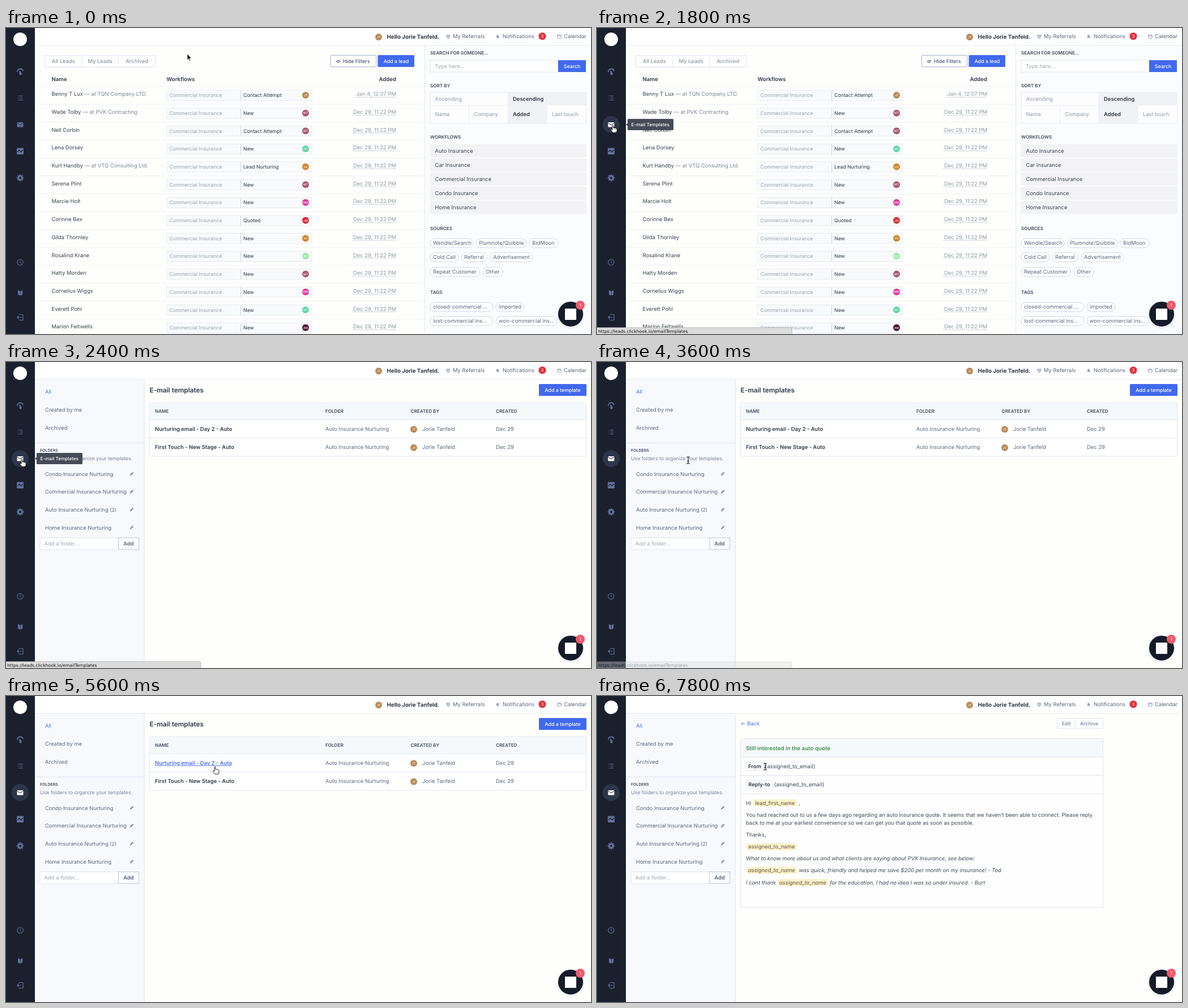
Animation, 1033 px wide and 542 px high, one loop 8 s. Source, as an HTML page:

```html
<!DOCTYPE html>
<html lang="en">
<head>
<meta charset="utf-8">
<title>Leads and e-mail templates</title>
<style>
html, body { margin: 0; width: 100%; height: 100%; overflow: hidden; background: #fefefd; }
svg { display: block; width: 100%; height: 100%; }
text { font-family: Inter, "Open Sans", sans-serif; text-rendering: geometricPrecision; white-space: pre; }
</style>
</head>
<body>
<svg id="stage" viewBox="0 0 1033 542"></svg>
<script>
const LOOP = 8000, STEP = 200;
const BLUE = '#4169ee', LINK = '#4a72e4', INK = '#2f3747', SLATE = '#5b667c', MUTE = '#8f98a6',
      EDGE = '#dde3ec', PALE = '#f6f9fc', TAN = '#b88c56', NAV = '#62709a';
const S = 9.43, M = 8.8, CAPS = 8.15;

// Text is placed by its left edge and the middle of its capitals.
const text = (x, y, s, fill = SLATE, size = S, weight = 400, extra = '') =>
  `<text x="${x}" y="${(y + size * 0.36).toFixed(2)}" fill="${fill}" font-size="${size}" font-weight="${weight}" ${extra}>${s}</text>`;
const mid = (x, y, s, fill, size, weight) => text(x, y, s, fill, size, weight, 'text-anchor="middle"');
const caps = (x, y, s, size = CAPS) => text(x, y, s, '#414a5c', size, 600);
const box = (x, y, x2, y2, fill, stroke = 'none', r = 0) =>
  `<rect x="${x}" y="${y}" width="${x2 - x}" height="${y2 - y}" rx="${r}" fill="${fill}" stroke="${stroke}" stroke-width=".9"/>`;
const line = (x, y, x2, y2, stroke = EDGE, extra = '') =>
  `<path d="M${x} ${y}L${x2} ${y2}" stroke="${stroke}" stroke-width=".9" ${extra}/>`;
const disc = (x, y, r, fill) => `<circle cx="${x}" cy="${y}" r="${r}" fill="${fill}"/>`;
const path = (d, fill = 'none', stroke = 'none', w = 1) =>
  `<path d="${d}" fill="${fill}" stroke="${stroke}" stroke-width="${w}" stroke-linejoin="round" stroke-linecap="round"/>`;
const avatar = (x, y, s, fill = TAN) => disc(x, y, 6, fill) + mid(x, y, s, '#fff', 5, 500);
const group = (id, s) => `<g id="${id}">${s}</g>`;

function sidebar() {
  let gear = '';
  for (let a = 0; a < 360; a += 45)
    gear += `<rect x="23.7" y="259.4" width="2.6" height="3" fill="${NAV}" transform="rotate(${a} 25 265.5)"/>`;
  return box(0, 0, 51, 542, '#1a202d') + disc(25, 20, 12, '#fff') +
    path('M20 77a5.2 5.2 0 0 1 10-1.5', 'none', NAV, 1.8) +
    path('M23.4 75.5q4.4 2.6 4.2 5.8a2 2 0 0 1-4 .2z', NAV) +
    [120.5, 124, 127.5].map(y => path(`M21 ${y}h.3M23.5 ${y}h5.5`, 'none', NAV, 1)).join('') +
    group('mail', `<circle id="halo" cx="25" cy="171" r="15" fill="#2d354a"/>
      <rect id="letter" x="19.5" y="167" width="11" height="8.4" rx="1"/>` +
      path('M20 168.6l5 3.2 5-3.2', 'none', '#1f2637', 1)) +
    box(19, 212.5, 31, 224, NAV, 'none', 1) + path('M20.5 219l3-2.5 3 3 3-3', 'none', '#1a202d', 1.2) +
    gear + `<circle cx="25" cy="265.5" r="3.2" fill="none" stroke="${NAV}" stroke-width="2.4"/>` +
    `<circle cx="25" cy="415" r="5.2" fill="none" stroke="${NAV}" stroke-width="1.1"/>` +
    path('M25 412v3.2l1.8 1.4', 'none', NAV) +
    path('M21 464.2l4 2v7.8l-4-2zM25.6 466l3.6-1.6v7.6l-3.6 2z', NAV) +
    path('M23 507.5h7v10h-7M27 512.5h-7M22.4 510l-2.5 2.5 2.5 2.5', 'none', NAV, 1.2);
}

function header() {
  return box(51, 0, 1033, 30, '#fff') + line(51, 30.5, 1033, 30.5, '#e6e9ee') +
    avatar(658, 16, 'JT') + text(672.5, 15, 'Hello Jorie Tanfeld.', INK, 9.8, 700) +
    path('M778 12.5h5.6v2.6q-.4 2.4-2.8 3.6-2.4-1.2-2.8-3.6z', '#c5ccdb', '#8793b0', .8) +
    text(789, 15, 'My Referrals') +
    path('M866 17.5v-3.2q0-2 2-2.2 2 .2 2 2.2l1.2 3.2z', '#9aa5bd') + text(877, 15, 'Notifications') +
    disc(947, 14.5, 6.6, '#e0323f') + mid(947, 14.5, '3', '#fff', 7.2) +
    box(973.8, 12.3, 980.2, 18.2, 'none', '#8d98b0', .8) + path('M974 14h6', 'none', '#8d98b0') +
    text(985, 15, 'Calendar');
}

const leads = [
  ['Benny T Lux', 'TQN Company LTD.', 'Contact Attempt', 'JT'], ['Wade Tolby', 'PVK Contracting', 'New', 'MT'],
  ['Nell Corbin', '', 'Contact Attempt', 'MT'], ['Lena Dorsey', '', 'New', 'DC'],
  ['Kurt Handby', 'VTQ Consulting Ltd.', 'Lead Nurturing', 'LU'], ['Serena Plint', '', 'New', 'MT'],
  ['Marcie Holt', '', 'New', 'MW'], ['Corinne Bex', '', 'Quoted', 'JW'],
  ['Gilda Thornley', '', 'New', 'LU'], ['Rosalind Krane', '', 'New', 'BC'],
  ['Hatty Morden', '', 'New', 'MT'], ['Cornelius Wiggs', '', 'New', 'MW'],
  ['Everett Pohl', '', 'New', 'DC'], ['Marion Feltwells', '', 'New', 'AM']
];
const tint = { JT: TAN, MT: '#a9596b', DC: '#62d8a4', LU: '#d2882d', MW: '#e23a9e', JW: '#d72c36', BC: '#9ceda4', AM: '#4d1234' };

function leadRow([name, firm, stage, owner], i) {
  const y = 117 + 31.68 * i, w = y + 2.2, dated = i ? 'Dec 29, 11:22 PM' : 'Jan 4, 12:07 PM';
  const at = firm && `<tspan fill="#7d8695"> — at ${firm}</tspan>`;
  return line(55, y - 13.5, 739, y - 13.5, '#eff1f4') + text(80.5, y, name + at, '#39414f') +
    box(283.5, w - 9, 540, w + 9.2, '#f8fafc', '#e6eaef') + line(414.5, w - 9, 414.5, w + 9.2, '#ccd3dd') +
    text(288.5, w, 'Commercial Insurance', '#9aa1ac', M) + text(419, w, stage, '#2f3745', M) +
    avatar(529, w - .2, owner, tint[owner]) +
    text(689, y, dated, MUTE, S, 400, 'text-anchor="end"') +
    line(i ? 611.5 : 617.5, y + 5.6, 689, y + 5.6, '#a3abb6', 'stroke-dasharray="1.2 .8"');
}

const chip = (x, x2, y, s) => box(x, y - 8, x2, y + 8, '#fff', '#cbd3e0', 8) + text(x + 5, y, s);

function filters() {
  const flows = ['Auto', 'Car', 'Commercial', 'Condo', 'Home'];
  return box(739, 31, 1033, 542, '#fbfcfd') + line(739.5, 31, 739.5, 542, '#e3e7ee') +
    caps(749, 44.5, 'SEARCH FOR SOMEONE...') + box(749, 57, 975, 78, '#fff', EDGE) +
    text(757, 67.5, 'Type here...', '#a0a7b3') + box(975, 57, 1024, 78, BLUE) + mid(999.5, 67.7, 'Search', '#fff', M, 500) +
    caps(749, 102, 'SORT BY') + box(749, 114, 1024.5, 169, '#fdfdfe', '#e6eaef') +
    path('M887 114H1024.5V137H955.5V169H887z', '#f1f2f5') + line(749, 137, 887, 137, '#e6eaef') +
    line(886.5, 114, 886.5, 137, '#e6eaef') + line(817.5, 137, 817.5, 169, '#e6eaef') + line(886.5, 137, 886.5, 169, '#e6eaef') +
    text(757.5, 126, 'Ascending', MUTE) + text(895, 126, 'Descending', INK, S, 600) +
    text(757.5, 153, 'Name', MUTE) + text(826.5, 153, 'Company', MUTE) + text(895, 153, 'Added', INK, S, 600) +
    text(964, 153, 'Last touch', MUTE) + caps(749, 193.5, 'WORKFLOWS') +
    flows.map((f, i) => box(749, 206 + 25 * i, 1025, 229 + 25 * i, '#f3f3f5') +
      text(757.5, 217.5 + 25 * i, f + ' Insurance', '#39414f')).join('') +
    caps(749, 355, 'SOURCES') + chip(749, 825, 381, 'Wendle/Search') + chip(830, 918.5, 381, 'Plumnote/Quibble') +
    chip(924, 975, 381, 'BidMoon') + chip(749, 799, 406, 'Cold Call') + chip(804, 849.5, 406, 'Referral') +
    chip(855, 930, 406, 'Advertisement') + chip(749, 836.5, 432, 'Repeat Customer') + chip(842, 877.5, 432, 'Other') +
    caps(749, 468, 'TAGS') + chip(749, 860, 494, 'closed-commercial ...') + chip(865, 915, 494, 'imported') +
    chip(749, 860, 519, 'lost-commercial ins...') + chip(865, 973, 519, 'won-commercial ins...');
}

function leadsPage() {
  return box(68.5, 48.5, 264, 69.5, '#fff', EDGE, 1.5) + line(134, 48.5, 134, 69.5) + line(198.5, 48.5, 198.5, 69.5) +
    mid(101.3, 59, 'All Leads', MUTE, S, 500) + mid(166.3, 59, 'My Leads', MUTE, S, 500) + mid(231.3, 59, 'Archived', MUTE, S, 500) +
    box(573.3, 48.3, 653.7, 68.8, '#fff', '#98a4ca', 1.5) + text(595, 59, 'Hide Filters', '#4a5570', M, 500) +
    path('M583 59q3.5-3.6 7 0-3.5 3.4-7 0M584.8 61.6l4-5', 'none', '#4a5570', .9) +
    box(656.5, 48, 721, 69, BLUE, 'none', 1.5) + mid(689, 59, 'Add a lead', '#fff', M, 500) +
    text(80.5, 90.5, 'Name', INK, 9.6, 600) + text(283.5, 90.5, 'Workflows', INK, 9.6, 600) +
    text(689, 90.5, 'Added', INK, 9.6, 600, 'text-anchor="end"') + leads.map(leadRow).join('') + filters();
}

function folders() {
  const names = ['Condo', 'Commercial', 'Auto', 'Home'];
  return box(51, 31, 244, 542, '#f7f9fc') + line(244.3, 31, 244.3, 542) +
    text(69, 53, 'All', LINK) + text(69, 85, 'Created by me') + text(69, 116.5, 'Archived') +
    line(51, 143.3, 244, 143.3) + caps(60, 156.8, 'FOLDERS', 7) +
    text(60, 171, 'Use folders to organize your templates.', '#78829a', M) +
    names.map((n, i) => {
      const y = 198.2 + 31.7 * i;
      return text(69, y, n + ' Insurance Nurturing' + (n == 'Auto' ? ` <tspan font-size="${M}">(2)</tspan>` : ''), SLATE, 9.38) +
        path(`M219.2 ${y + 2.6}l.6-2 3.8-3.7 1.3 1.4-3.8 3.7z`, '#7c8598', '#7c8598', .5);
    }).join('') +
    box(60, 311.5, 198.5, 332, '#fff', EDGE) + text(67.5, 321.5, 'Add a folder...', '#a0a7b3') +
    box(198.5, 311.5, 234.5, 332, '#fbfcfe', '#b9c4d8') + mid(216.5, 322, 'Add', SLATE, S, 600);
}

function listPage() {
  const row = (y, id, name) => text(263, y, name, INK, S, 600, `id="${id}"`) + text(564, y, 'Auto Insurance Nurturing') +
    avatar(720, y + .8, 'JT') + text(735, y, 'Jorie Tanfeld') + text(865, y, 'Dec 29');
  return text(253.5, 50, 'E-mail templates', INK, 11.8, 600) +
    box(941, 39, 1025, 60, BLUE, 'none', 1.5) + mid(983, 50, 'Add a template', '#fff', M, 500) +
    box(253.5, 72, 1024.5, 167, '#fff', EDGE, 1.5) + box(254, 72.5, 1024, 102, PALE) +
    line(253.5, 102.3, 1024.5, 102.3) + line(253.5, 134.6, 1024.5, 134.6) +
    caps(263, 87, 'NAME') + caps(564, 87, 'FOLDER') + caps(714.5, 87, 'CREATED BY') + caps(865, 87, 'CREATED') +
    row(118.5, 'link', 'Nurturing email - Day 2 - Auto') + row(151, 'other', 'First Touch - New Stage - Auto');
}

function mailPage() {
  const body = (x, y, s, extra = '') => text(x, y, s, '#3f4757', S, 400, extra);
  const ital = (x, y, s) => body(x, y, s, 'font-style="italic"');
  const field = (x, x2, y, s, style = '') => box(x, y - 6.3, x2, y + 6.3, '#fcf1ca', 'none', 5) +
    text((x + x2) / 2, y, s, '#5c5640', S, 400, `text-anchor="middle" ${style}`);
  const label = (x2, y, s) => box(263.4, y - 7.3, x2, y + 7.3, '#fff', EDGE, 1.5) + mid((263.4 + x2) / 2, y, s, INK, S, 600);
  return text(253.5, 48.5, '← Back', LINK) +
    box(812.5, 39.5, 893.5, 57.5, '#fdfdfe', EDGE, 1.5) + line(845, 39.5, 845, 57.5) +
    mid(828.7, 48.5, 'Edit', '#7c8698', M, 500) + mid(869, 48.5, 'Archive', '#7c8698', M, 500) +
    box(253.5, 75.5, 893.5, 374.5, '#fefefe', EDGE, 1.5) + box(254, 76, 893, 108, PALE) +
    [108.2, 140.6, 173].map(y => line(253.5, y, 893.5, y)).join('') +
    text(263, 92, 'Still interested in the auto quote', '#3c8f4a', 9.75, 600) +
    label(293.5, 124.6, 'From') + body(296.5, 124.6, '{assigned_to_email}') +
    label(309.5, 157, 'Reply-to') + body(312.5, 157, '{assigned_to_email}') +
    body(263, 189.3, 'Hi') + field(275, 353.5, 189.3, 'lead_first_name') + body(356, 189.3, ',') +
    body(263, 210.7, 'You had reached out to us a few days ago regarding an auto insurance quote. It seems that we haven’t been able to connect. Please reply') +
    body(263, 224.8, 'back to me at your earliest convenience so we can get you that quote as soon as possible.') +
    body(263, 245.5, 'Thanks,') + field(263, 353.5, 267, 'assigned_to_name') +
    ital(263, 287.5, 'What to know more about us and what clients are saying about PVK Insurance, see below:') +
    field(263, 353.5, 309, 'assigned_to_name', 'font-style="italic"') +
    ital(356.5, 309, 'was quick, friendly and helped me save $200 per month on my insurance! - Tod') +
    ital(263, 330.3, 'I cant thank') + field(319, 407.5, 330.3, 'assigned_to_name', 'font-style="italic"') +
    ital(411, 330.3, 'for the education, I had no idea I was so under insured. - Burt');
}

function overlays() {
  return group('tip', path('M51 171l4-3.2v6.4z', '#454c58') + box(54, 161, 135, 181, '#454c58', 'none', 1.5) +
      text(60.5, 171, 'E-mail Templates', '#fff', 8.2, 500)) +
    disc(997, 508, 24.5, 'rgba(20,25,40,.05)') + disc(997, 506.7, 22, '#161b29') + box(987, 497, 1007, 517, '#fff') +
    disc(1014, 491, 8, '#ee5a6c') + mid(1014, 491, '1', '#fff', 8) +
    group('status', box(-1, 530.8, 344, 543, '#dcdcdc', '#b4b4b4', 1.5) +
      text(2, 537, 'https://leads.clickhook.io/emailTemplates', '#111', 7.7, 400, 'style="font-family:\'DejaVu Sans\',sans-serif"')) +
    group('cursor',
      group('arrow', path('M0 0v10.6l2.4-2.2 1.7 3.8 1.7-.8-1.7-3.6h3.3z', '#111', '#fff', .7)) +
      group('hand', path('M-1 1q1-1.6 2 0v4.2q1.6-1 2.4.2 1.4-.6 2 .6 1.6-.4 1.8 1v2.3q0 1.8-1.2 3.9H0q-2.2-2.6-3.6-4.9.2-1.6 1.6-.9L-1 8.3z', '#fff', '#111', .9)) +
      group('beam', ['#fff', '#111'].map((c, i) =>
        path('M-2.5-6q2 0 2.5 1 .5-1 2.5-1M0-5v10M-2.5 6q2 0 2.5-1 .5 1 2.5 1M-1.3 1.5h2.6', 'none', c, i ? 1.1 : 1.8)).join('')));
}

document.getElementById('stage').innerHTML = box(0, 0, 1033, 542, '#fefefd') +
  group('leads', leadsPage()) + group('folders', folders()) + group('list', listPage()) + group('preview', mailPage()) +
  header() + sidebar() + overlays();

// Pointer stops: time, x, y
const stops = [
  [0, 320, 46], [1200, 28, 172], [3000, 28, 172], [3600, 161, 174], [4200, 290, 163], [4800, 352, 124],
  [5200, 374, 122], [5600, 369, 125], [6200, 369, 125], [6800, 369, 93], [7200, 345, 93], [7800, 297, 125]
];
function pointer(t) {
  const i = stops.findIndex(s => s[0] > t);
  if (i < 0) return stops[stops.length - 1].slice(1);
  const [t0, x0, y0] = stops[i - 1], [t1, x1, y1] = stops[i];
  let k = (t - t0) / (t1 - t0);
  if (i == 1) k = k * k * (3 - 2 * k);
  return [x0 + (x1 - x0) * k, y0 + (y1 - y0) * k];
}

const el = id => document.getElementById(id);
const show = (id, on) => el(id).setAttribute('display', on ? 'inline' : 'none');

function draw(t) {
  const page = t < 2200 ? 'leads' : t < 6000 ? 'list' : 'preview';
  for (const p of ['leads', 'list', 'preview']) show(p, p == page);
  show('folders', page != 'leads');

  const [x, y] = pointer(t);
  const onLink = page == 'list' && x > 263 && x < 400 && y > 112 && y < 127;
  const shape = x < 51 || onLink ? 'hand' : page == 'preview' || page == 'list' && x < 244 ? 'beam' : 'arrow';
  for (const s of ['arrow', 'hand', 'beam']) show(s, s == shape);
  el('cursor').setAttribute('transform', `translate(${x.toFixed(1)} ${y.toFixed(1)})`);
  el('link').setAttribute('fill', onLink ? LINK : INK);
  el('link').setAttribute('text-decoration', onLink ? 'underline' : 'none');

  const active = t >= 1200;
  show('halo', active);
  el('letter').setAttribute('fill', active ? '#fff' : NAV);
  show('tip', active && t < 3200);
  el('status').setAttribute('opacity', t < 1400 ? 0 : Math.max(0, Math.min(1, (3800 - t) / 500)));
}

const start = performance.now();
function tick() {
  const t = (performance.now() - start) % LOOP;
  draw(Math.floor(t / STEP) * STEP);
  requestAnimationFrame(tick);
}
tick();
</script>
</body>
</html>
```
